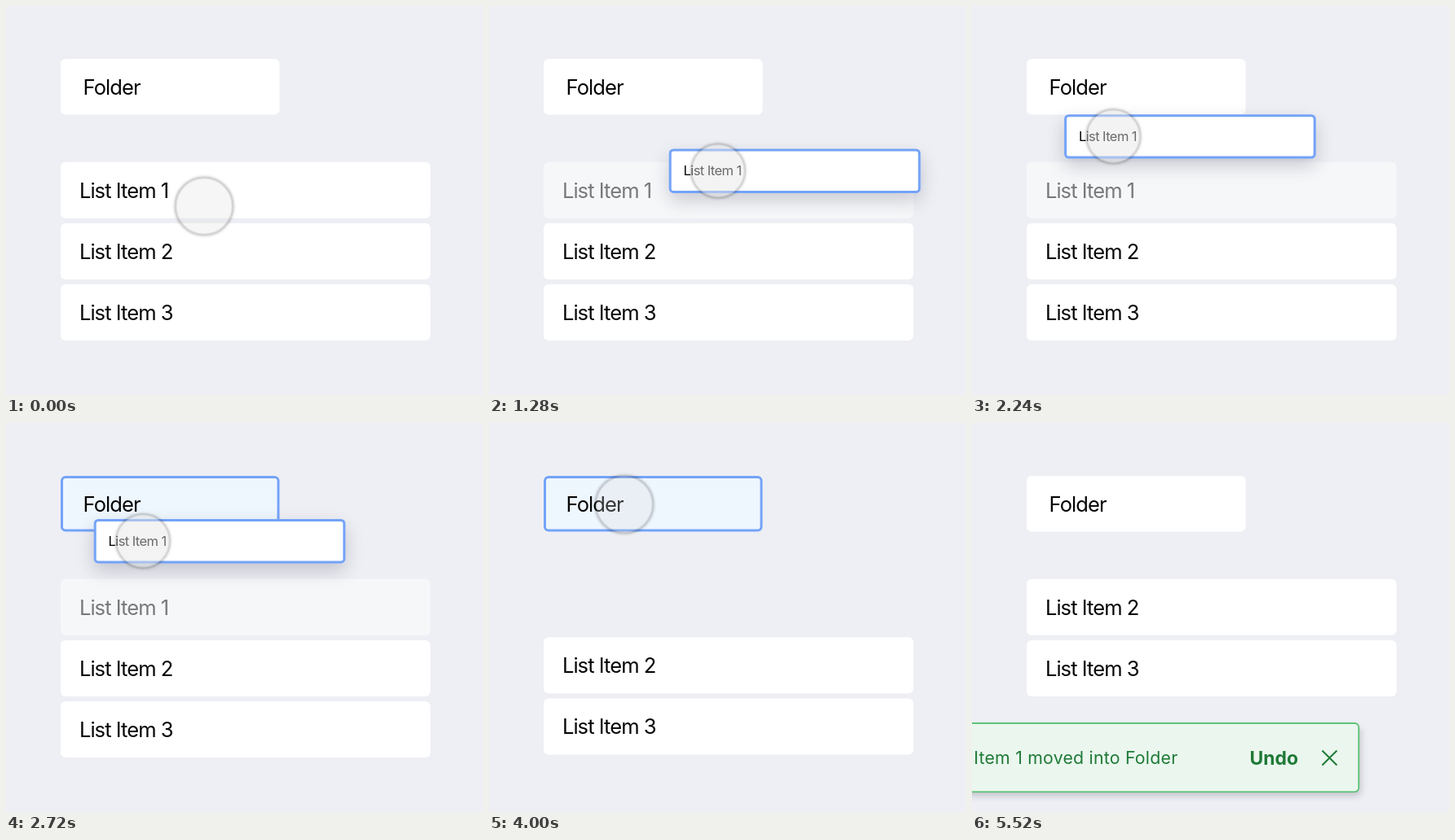
An HTML page that plays this animation: 585 by 478 pixels, repeating every 5.6 s.

```html
<!DOCTYPE html>
<html lang="en">
<head>
<meta charset="utf-8">
<title>Drag into folder</title>
<style>
  html, body { margin: 0; width: 100%; height: 100%; overflow: hidden; background: #eeeff4; }
  svg { display: block; width: 100vw; height: 100vh; font-family: Inter, sans-serif; }
  .label { font-size: 25.5px; letter-spacing: -0.93px; fill: #050505; }
  .box { fill: #fff; }
  .lit { fill: #eef6fe; stroke: #74a3f8; stroke-width: 3; }
  .toast { fill: #1f7a37; }
</style>
</head>
<body>
<svg viewBox="0 0 585 478">
  <defs>
    <filter id="soft" x="-30%" y="-100%" width="160%" height="300%"><feGaussianBlur stdDeviation="11"/></filter>
    <filter id="near" x="-10%" y="-30%" width="120%" height="160%"><feGaussianBlur stdDeviation="4"/></filter>
    <filter id="glow" x="-20%" y="-20%" width="140%" height="140%"><feGaussianBlur stdDeviation="1.3"/></filter>
  </defs>
  <rect width="585" height="478" fill="#eeeff4"/>

  <rect class="box" x="67" y="65" width="268.5" height="68.5" rx="6"/>
  <rect id="lit" class="lit" x="68.5" y="66.5" width="265.5" height="65.5" rx="4.5"/>
  <text class="label" x="94.6" y="109">Folder</text>

  <g id="list"></g>

  <g id="card">
    <rect id="shade" fill="#3a3c55" rx="6" filter="url(#soft)"/>
    <rect id="face" class="box" rx="4" stroke="#74a3f8"/>
    <text id="name" fill="#050505">List Item 1</text>
  </g>

  <g id="toast">
    <rect x="-20" y="374" width="497" height="84" rx="6" fill="#30354a" opacity=".24" filter="url(#near)"/>
    <rect x="-20" y="368.9" width="494.3" height="84.4" rx="5" fill="#eaf6ee" stroke="#4fbd68" stroke-width="1.6"/>
    <text class="toast" x="2.2" y="419" font-size="21.3" letter-spacing=".22">Item 1 moved into Folder</text>
    <text class="toast" x="340.4" y="420" font-size="23" font-weight="700">Undo</text>
    <path d="M429.5 402.5l18 18m0-18l-18 18" fill="none" stroke="#1f7a37" stroke-width="2"/>
  </g>

  <g id="cursor">
    <circle r="36" fill="none" stroke="#000" stroke-opacity=".11" stroke-width="3.4" filter="url(#glow)"/>
    <circle id="disc" r="35"/>
    <circle r="35.2" fill="none" stroke="#000" stroke-opacity=".085" stroke-width="2.8"/>
  </g>
</svg>
<script>
const LOOP = 5600;
const $ = id => document.getElementById(id);
const set = (el, attrs) => { for (const k in attrs) el.setAttribute(k, attrs[k]); };
const mix = (a, b, u) => a + (b - a) * u;
const span = (t, a, b) => Math.min(1, Math.max(0, (t - a) / (b - a)));
const inOut = u => u < .5 ? 2 * u * u : 1 - 2 * (1 - u) * (1 - u);
const out = u => 1 - (1 - u) ** 3;
const ease = (t, a, b) => inOut(span(t, a, b));

// Pointer moves: start, end, x, y
const home = [243, 246];
const moves = [
  [0, 240, 257, 229],
  [720, 1280, 281, 202.5],
  [1280, 1760, 183, 186.5],
  [1880, 2480, 169, 148],
  [2480, 2720, 168, 145],
  [3200, 3840, 166, 100]
];

const top0 = 191.7, pitch = 75.2;
$('list').innerHTML = [1, 2, 3].map(n =>
  `<g><rect class="box" x="67" width="453.5" height="69" rx="6"/>` +
  `<text class="label" x="89.9" y="44">List Item ${n}</text></g>`).join('');
const rows = [...$('list').children];

function pointer(t) {
  let [x, y] = home;
  for (const [a, b, px, py] of moves) {
    const u = ease(t, a, b);
    x = mix(x, px, u);
    y = mix(y, py, u);
  }
  return [x, y];
}

function drawCard(t, cx, cy) {
  const u = ease(t, 640, 960);
  const x = mix(67, cx - 60.3, u), y = mix(top0, cy - 27, u);
  const w = mix(453.5, 308.6, u), h = mix(69, 54.4, u);
  const edge = 3 * span(t, 640, 760);
  set($('card'), { visibility: t > 640 && t < 3920 ? 'visible' : 'hidden' });
  set($('shade'), { x, y: y + 9, width: w, height: h, opacity: .24 * u });
  set($('face'), {
    x: x + edge / 2, y: y + edge / 2, width: w - edge, height: h - edge, 'stroke-width': edge
  });
  set($('name'), {
    x: x + mix(22.9, 17.8, u), y: y + mix(44, 33, u),
    'font-size': mix(25.5, 16.5, u), 'letter-spacing': mix(-.93, -.58, u)
  });
}

function drawCursor(t, x, y) {
  const press = ease(t, 320, 480) - ease(t, 3840, 3990);
  const leave = out(span(t, 4560, 5120));
  const scale = mix(1, .935, press) * mix(1, 1.6, leave);
  const shade = Math.round(mix(214, 228, press));
  set($('cursor'), { transform: `translate(${x} ${y}) scale(${scale})`, opacity: 1 - leave });
  set($('disc'), { fill: `rgb(${shade},${shade},${shade})`, 'fill-opacity': mix(.23, .45, press) });
}

function draw(t) {
  const [x, y] = pointer(t);
  const lift = ease(t, 3920, 4440) * pitch;
  rows.forEach((row, i) =>
    set(row, { transform: `translate(0 ${top0 + i * pitch - (i ? lift : 0)})` }));
  set(rows[0], { opacity: t < 3920 ? 1 - .5 * span(t, 640, 800) : 0 });
  set($('lit'), { opacity: ease(t, 2320, 2560) - ease(t, 4160, 4400) });
  set($('toast'), {
    transform: `translate(0 ${115 * (1 - out(span(t, 4060, 4480)))})`,
    visibility: t > 4060 ? 'visible' : 'hidden'
  });
  drawCard(t, x, y);
  drawCursor(t, x, y);
}

const start = performance.now();
function tick() {
  draw((performance.now() - start) % LOOP);
  requestAnimationFrame(tick);
}
tick();
</script>
</body>
</html>
```
